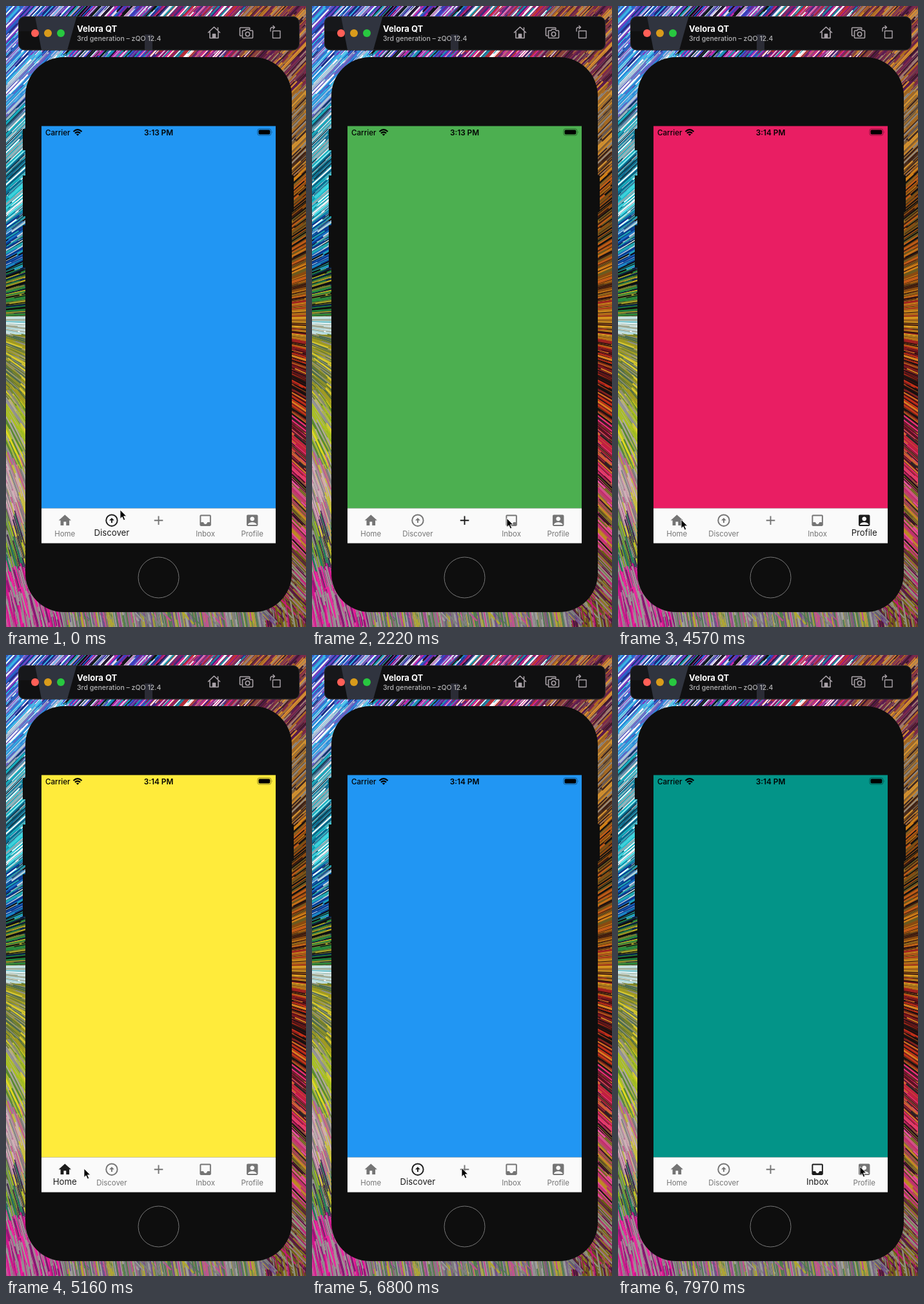
An HTML page with a canvas for the animation above (8000 ms loop, 465 by 960 pixels).

```html
<!DOCTYPE html>
<html lang="en">
<head>
<meta charset="utf-8">
<style>
  html, body { margin: 0; width: 100%; height: 100%; overflow: hidden; background: #111; }
  canvas, svg { position: absolute; left: 0; top: 0; display: block; }
  text { font-family: Inter, Roboto, sans-serif; }
</style>
</head>
<body>
<canvas id="wall" width="465" height="960"></canvas>
<svg width="465" height="960" viewBox="0 0 465 960">
  <!-- window toolbar -->
  <rect x="19" y="16" width="436" height="52.5" rx="10" fill="#101011"/>
  <path d="M28 16.5H45L50 39H20V25Q20 17 28 16.5z" fill="#17181b"/>
  <path d="M45 16.5H109.5L95 68H55z" fill="#30343f"/>
  <path d="M215 44H227V68H215z" fill="#2b2c36"/>
  <rect x="19.5" y="16.5" width="435" height="51.5" rx="9.5" fill="none" stroke="#3a3a3d" stroke-width=".7"/>
  <circle cx="45" cy="42" r="6" fill="#ff5f57"/>
  <circle cx="65" cy="42" r="6" fill="#d99b1b"/>
  <circle cx="85" cy="42" r="6" fill="#28c840"/>
  <text x="110" y="40" font-size="13" font-weight="700" fill="#fff">Velora QT</text>
  <text x="110" y="54" font-size="10.5" font-weight="500" fill="#b4b4b6">3rd generation – zQO 12.4</text>
  <g fill="none" stroke="#a9a2a8" stroke-width="1.6" stroke-linejoin="round" stroke-linecap="round">
    <path d="M313.5 41L322.5 32.5 331.5 41M316 39.5V49.5H329V39.5M328.5 37V33.5"/>
    <path d="M320.5 49V43.5H324.5V49z" fill="#a9a2a8"/>
    <path d="M365 46H363.5Q362.5 46 362.5 45V34.5Q362.5 33.5 363.5 33.5H376.5Q378 33.5 378 35"/>
    <path d="M367.5 38H370.5L372 36H377L378.5 38H381.5Q382.5 38 382.5 39V48.5Q382.5 49.5 381.5 49.5H367.5Q366.5 49.5 366.5 48.5V39Q366.5 38 367.5 38z"/>
    <circle cx="374.5" cy="43.5" r="3.2"/>
    <path d="M413.5 38.5H425V49.5H413.5zM410 39V36Q410 33 413 33H416M414 30.5L416.5 33 414 35.5" stroke-width="1.4"/>
  </g>

  <!-- phone -->
  <g fill="#0e0e0e">
    <path d="M26 190H32V223H26zM26 262H32V325H26zM26 339H32V404H26zM440 262H446V318H440z"/>
    <rect x="30" y="79" width="413" height="858" rx="60"/>
  </g>
  <circle cx="236.5" cy="883.5" r="31.5" fill="none" stroke="#777"/>
  <rect id="page" x="55" y="185.6" width="363" height="591"/>
  <rect x="55" y="776.5" width="363" height="54" fill="#fafafa"/>

  <!-- status bar -->
  <text x="61" y="199.8" font-size="11.6" font-weight="500">Carrier</text>
  <path d="M104.5 194.2Q111 188 117.5 194.2M106.9 196.8Q111 193 115.1 196.8" fill="none" stroke="#000" stroke-width="2"/>
  <path d="M108.7 198.3Q111 196.6 113.3 198.3L111 200.8z"/>
  <text id="clock" x="236.5" y="199.8" font-size="11.8" font-weight="600" text-anchor="middle"></text>
  <rect x="389.9" y="190" width="21" height="10" rx="3" fill="none" stroke="#000" stroke-opacity=".4"/>
  <rect x="391.5" y="191.5" width="17.8" height="7" rx="1.7"/>
  <path d="M412 193.5Q413.6 195 412 196.5z" opacity=".4"/>

  <g id="tabs" text-anchor="middle"></g>
  <path id="cursor" d="M0 0V13.5L3.1 10.7 5.4 16 7.7 15 5.4 9.8H9.7z" stroke="#fff" stroke-width=".8"/>
</svg>
<script>
const $ = id => document.getElementById(id);

// ---- wallpaper: streaks that lie flat at mid height and tilt away from it
let seed = 7;
const rnd = () => (seed = seed * 16807 % 2147483647) / 2147483647;

const regions = [ // x, y, width, height, colours
  [0, 0, 100, 90, '#2a62c8 #fff #7a3fc0 #1b2a80 #35b6e8 #c9b8e8'],
  [100, 0, 140, 90, '#5a2a9a #c22aa8 #2453d6 #111 #e9d8f0 #18a0b0'],
  [240, 0, 130, 90, '#8a1f6a #d92a90 #3a2a80 #fff #1a8fa0 #c03030'],
  [370, 0, 95, 130, '#7a2a4a #b06a20 #5a1a50 #d89030 #3a1a2a #a08070'],
  [0, 90, 90, 80, '#2a8ad8 #fff #6a60c0 #1140a0 #40c0e8 #b0c8d8'],
  [0, 170, 35, 160, '#18b0c0 #fff #0a6a90 #40d8e0 #0a3a50 #90a8b0'],
  [0, 330, 35, 80, '#0a3a90 #1878d0 #111 #20a8b0 #c0d8e0'],
  [0, 410, 35, 70, '#101010 #208a40 #c0b020 #0a2a50 #111 #708030'],
  [0, 480, 35, 28, '#c8e0e0 #fff #80c8d0 #a0a890'],
  [0, 508, 35, 110, '#a09a20 #6a7a30 #d8c830 #4a6a50 #909080'],
  [0, 618, 35, 100, '#a8c020 #e0d820 #909090 #b0a8a0 #5a8a30'],
  [0, 718, 35, 90, '#a8a0a0 #d0b0b8 #c06090 #808080 #c8c040'],
  [0, 808, 40, 75, '#6a9a30 #d8d020 #207a60 #909090 #402a50'],
  [0, 883, 90, 77, '#c81888 #f020a0 #801870 #909090 #a09898'],
  [440, 130, 25, 130, '#a86a20 #d09030 #705a40 #3a2018 #908880'],
  [440, 260, 25, 190, '#8a4a10 #d08018 #3a1a10 #c05a18 #6a5a20 #111'],
  [440, 450, 25, 80, '#b06a18 #e0a020 #a02020 #301010 #806020'],
  [440, 530, 25, 110, '#301010 #c03018 #111 #d88020 #801820'],
  [440, 640, 25, 100, '#c02040 #e83078 #501020 #d07030 #222'],
  [440, 740, 25, 110, '#c03070 #c09020 #201018 #e850a0 #707020'],
  [400, 850, 65, 110, '#6a5a18 #c81878 #8a7a20 #501840 #909080'],
  [90, 930, 310, 30, '#808080 #b0a830 #70508a #a0a0a0 #507a50 #c05090']
];

const g = $('wall').getContext('2d');
const palettes = regions.map(r => r[4].split(' '));
regions.forEach(([x, y, w, h], i) => {
  g.fillStyle = palettes[i][0];
  g.fillRect(x, y, w, h);
});
regions.forEach(([x0, y0, w, h], i) => {
  for (let n = w * h / 20; n > 0; n--) {
    const x = x0 + rnd() * w, y = y0 + rnd() * h;
    let a = .82 * Math.tanh((y - 485) / 150);
    if (x < 90 && y > 485) a *= 1.6;
    if (y > 935) a = 1.4;
    const len = 10 + rnd() * 30;
    const dx = Math.cos(a) * len, dy = Math.sin(a) * len;
    g.strokeStyle = palettes[i][rnd() * palettes[i].length | 0];
    g.lineWidth = .8 + rnd() * 2;
    g.beginPath();
    g.moveTo(x - dx, y - dy);
    g.lineTo(x + dx, y + dy);
    g.stroke();
  }
});

// ---- tabs
const tabs = [
  ['Home', '#ffeb3b', 'M10 20v-6h4v6h5v-8h3L12 3 2 12h3v8z'],
  ['Discover', '#2196f3', 'M12 2a10 10 0 1 0 0 20a10 10 0 1 0 0-20zm0 2a8 8 0 1 1 0 16a8 8 0 1 1 0-16zM11 12v4h2v-4h3l-4-4-4 4z'],
  ['', '#4caf50', 'M19 13h-6v6h-2v-6H5v-2h6V5h2v6h6z'],
  ['Inbox', '#039488', 'M19 3H5c-1.1 0-2 .9-2 2v14c0 1.1.9 2 2 2h14c1.1 0 2-.9 2-2V5c0-1.1-.9-2-2-2zm0 12h-4c0 1.66-1.35 3-3 3s-3-1.34-3-3H5V5h14v10z'],
  ['Profile', '#e91e63', 'M19 3H5c-1.1 0-2 .9-2 2v14c0 1.1.9 2 2 2h14c1.1 0 2-.9 2-2V5c0-1.1-.9-2-2-2zm-7 3c1.93 0 3.5 1.57 3.5 3.5S13.93 13 12 13s-3.5-1.57-3.5-3.5S10.07 6 12 6zm7 13H5v-.23c0-.62.28-1.2.76-1.58C7.47 15.82 9.64 15 12 15s4.53.82 6.24 2.19c.48.38.76.97.76 1.58V19z']
];
$('tabs').innerHTML = tabs.map(([label, , icon], i) => {
  const x = 91.3 + i * 72.6;
  return `<g><path transform="translate(${x - 11.6} 783.6) scale(.968)" fill-rule="evenodd" d="${icon}"/>` +
    `<text x="${x}">${label}</text></g>`;
}).join('');

const LOOP = 8000, STEP = 147.7;
const taps = [[-9, 1], [6, 2], [17, 3], [24, 4], [33, 0], [37, 1], [48, 2], [52, 3]];
const path = [
  [0, 177, 779], [4, 233, 797], [10, 233, 797], [15, 302, 792], [19, 302, 792],
  [22, 376, 797], [25, 376, 797], [31, 98, 794], [33, 98, 794], [35, 144, 794],
  [37, 144, 794], [39, 165, 798], [41, 165, 798], [46, 232, 793], [48, 232, 793],
  [50, 301, 794], [52, 301, 794], [54, 375, 791]
];
const mix = (a, b, p) => a + (b - a) * p;

function cursorAt(step) {
  const i = path.findIndex(k => k[0] >= step);
  if (i < 1) return path[i ? path.length - 1 : 0].slice(1);
  const [a, b] = [path[i - 1], path[i]];
  const p = (step - a[0]) / (b[0] - a[0]), e = p * p * (3 - 2 * p);
  return [mix(a[1], b[1], e), mix(a[2], b[2], e)];
}

function draw(now) {
  const step = Math.floor((now % LOOP + 8) / STEP);
  const last = taps.filter(t => t[0] <= step).length - 1;
  const [start, active] = taps[last];
  const before = last ? taps[last - 1][1] : -1;
  const grow = Math.min(1, (step - start + 1) / 2);

  $('page').setAttribute('fill', tabs[active][1]);
  $('clock').textContent = step < 27 ? '3:13 PM' : '3:14 PM';
  [...$('tabs').children].forEach((tab, i) => {
    const p = i === active ? grow : i === before ? 1 - grow : 0;
    const shade = Math.round(mix(117, 28, p));
    tab.setAttribute('fill', `rgb(${shade},${shade},${shade})`);
    tab.lastChild.setAttribute('font-size', mix(11.4, 13.2, p));
    tab.lastChild.setAttribute('y', mix(820, 819.3, p));
  });
  $('cursor').setAttribute('transform', `translate(${cursorAt(step)})`);
  requestAnimationFrame(draw);
}
requestAnimationFrame(draw);
</script>
</body>
</html>
```
